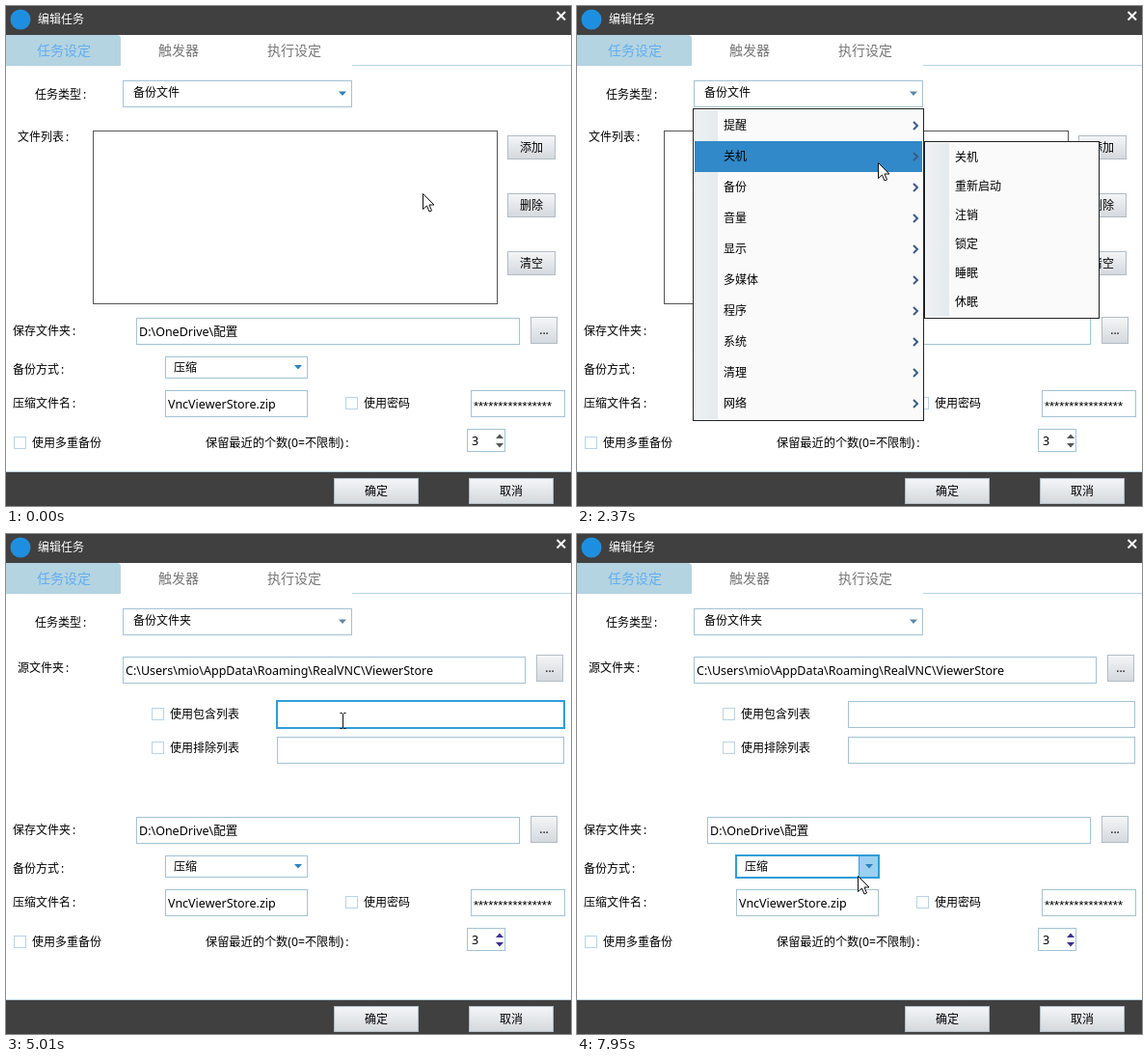
Write an HTML page with a canvas that moves like this. It is 586 px wide and 518 px high and loops after 8 s.

```html
<!DOCTYPE html>
<html lang="zh">
<head>
<meta charset="utf-8">
<style>
html, body { margin: 0; width: 100%; height: 100%; overflow: hidden; background: #fff; }
canvas { display: block; }
</style>
</head>
<body>
<canvas id="stage" width="586" height="518"></canvas>
<script>
const c = document.getElementById('stage').getContext('2d');
const LOOP = 8000, MENU_AT = 1570, PAGE_AT = 3790;
const FONT = '"Noto Sans", "Noto Sans CJK SC", "Noto Sans CJK", sans-serif';
const EDGE = '#a3c3d6', PALE = '#b9d4e4', HOT = '#2f9ed9', SELECT = '#3189c9', DARK = '#404040';

// Pointer moves: start, last step, number of steps, destination
const moves = [
  [260, 1020, 12, 340, 78],
  [2030, 2170, 3, 312, 156],
  [2370, 2510, 3, 312, 180],
  [2710, 2920, 4, 438, 203],
  [2990, 3190, 3, 437, 212],
  [3790, 3860, 2, 438, 213],
  [3930, 4210, 5, 440, 190],
  [4410, 4680, 4, 352, 163],
  [4940, 5010, 2, 349, 193],
  [5080, 5690, 8, 196, 196],
  [5960, 6170, 4, 221, 219],
  [6240, 6310, 2, 224, 220],
  [6560, 6630, 2, 215, 184],
  [6850, 7540, 11, 265, 319],
  [7610, 7950, 5, 291, 354]
];
const clicks = [[1420, 1570], [3520, 3790], [5890, 5960], [6310, 6380], [6450, 6520], [6780, 6850]];

const menu = ['提醒', '关机', '备份', '音量', '显示', '多媒体', '程序', '系统', '清理', '网络'];
const submenus = {
  1: ['关机', '重新启动', '注销', '锁定', '睡眠', '休眠'],
  2: ['备份文件', '备份文件夹', '备份系统目录', '备份注册表分支', '同步文件夹']
};

const shapes = {
  arrow: new Path2D('M0 0V16L4 12.5 6.5 18.5 9 17.5 6.5 11.5H11.5Z'),
  hand: new Path2D('M-2 13V1q0-2 2-2t2 2V8q2-2 4 .5 2-1.5 4 1 2.500-.5 2.500 2V15q0 3-2 5V23H0V21L-5 14q-2-3 0-4 1.500-.5 3 2z'),
  beam: new Path2D('M-3-8h2l1 1 1-1h2M0-7V7M-3 8h2l1-1 1 1h2')
};

let mouse;
const between = (t, a, b) => t >= a && t < b;
const over = (x, y, w, h) => between(mouse.x, x, x + w) && between(mouse.y, y, y + h);

function pointerAt(t) {
  let x = 432, y = 194;
  for (const [start, end, steps, toX, toY] of moves) {
    if (t < start) break;
    const step = Math.floor((t - start) / (end - start) * (steps - 1) + 1.001);
    const p = Math.min(1, step / steps), e = p * p * (3 - 2 * p);
    x += (toX - x) * e;
    y += (toY - y) * e;
  }
  return { x: Math.round(x), y: Math.round(y), kind: 'arrow' };
}

function fill(x, y, w, h, color) {
  c.fillStyle = color;
  c.fillRect(x, y, w, h);
}

function frame(x, y, w, h, color = EDGE) {
  c.strokeStyle = color;
  c.lineWidth = 1;
  c.strokeRect(x + .5, y + .5, w - 1, h - 1);
}

function line(color, width, ...points) {
  c.strokeStyle = color;
  c.lineWidth = width;
  c.beginPath();
  points.forEach(([x, y]) => c.lineTo(x, y));
  c.stroke();
}

// y is the middle of the glyphs
function text(s, x, y, color = '#000', size = 12, align = 'left', font = FONT) {
  c.font = `${size}px ${font}`;
  c.fillStyle = color;
  c.textAlign = align;
  c.fillText(s, x, Math.round(y + size * .37));
}

function label(s, x, y, size = 12) {
  text(s + '\u2009:', x, y, '#000', size);
}

function triangle(x, y, dir, color) {
  c.fillStyle = color;
  c.beginPath();
  c.moveTo(x - 4, y - 2 * dir);
  c.lineTo(x + 4, y - 2 * dir);
  c.lineTo(x, y + 2.5 * dir);
  c.fill();
}

function button(name, x, y, w, h) {
  const g = c.createLinearGradient(0, y, 0, y + h);
  g.addColorStop(0, '#f5f6f7');
  g.addColorStop(1, '#d3d8dd');
  fill(x, y, w, h, g);
  frame(x, y, w, h, '#b3bcc4');
  text(name, x + w / 2, y + h / 2, '#000', 12, 'center');
}

function box(x, y, w, h, hot, edge = EDGE) {
  fill(x, y, w, h, '#fff');
  frame(x, y, w, h, edge);
  if (hot) {
    c.strokeStyle = HOT;
    c.lineWidth = 2;
    c.strokeRect(x, y, w, h);
  }
}

function field(value, x, y, w) {
  const hot = over(x, y, w, 28);
  box(x, y, w, 28, hot);
  if (hot) mouse.kind = 'beam';
  text(value, x + 3, y + 14, '#000', 12.5);
}

function combo(value, x, y, w, h, hot, arrow = '#2f80bd') {
  const big = h > 25;
  box(x, y, w, h, hot);
  if (hot) {
    fill(x + w - 20, y + 1, 19, h - 2, '#9bd0f2');
    line(HOT, 1, [x + w - 20.5, y], [x + w - 20.5, y + h]);
  }
  text(value, x + (big ? 11 : 9), y + (big ? 13 : 12));
  triangle(x + w - 10, y + h / 2 - .5, 1, arrow);
}

function check(name, x, y, on = false, live = false) {
  const hot = live && over(x, y - 2, 93, 20);
  if (hot) mouse.kind = 'hand';
  box(x, y, 13, 13, false, PALE);
  if (hot || on) {
    c.strokeStyle = HOT;
    c.lineWidth = 2;
    c.strokeRect(x, y, 13, 13);
  }
  if (on) line('#6da31f', 2.5, [x + 3, y + 6], [x + 6, y + 10], [x + 11, y + 2]);
  text(name, x + 19, y + 7);
}

function windowFrame() {
  fill(0, 0, 586, 518, '#fff');
  fill(0, 0, 586, 30, DARK);
  c.fillStyle = '#1e8fe0';
  c.beginPath();
  c.arc(15, 14, 10.5, 0, 7);
  c.fill();
  text('编辑任务', 33, 14, '#fff');
  line('#fff', 2, [571.5, 6], [580, 14.5]);
  line('#fff', 2, [580, 6], [571.5, 14.5]);
  c.fillStyle = '#b5d4e2';
  c.beginPath();
  c.roundRect(0, 30, 119, 32, [0, 4, 0, 0]);
  c.fill();
  text('任务设定', 32, 46, '#62aeee', 14);
  text('触发器', 158, 46, '#777', 14);
  text('执行设定', 271, 46, '#777', 14);
  fill(359, 61, 227, 1, PALE);
  fill(0, 482, 586, 1, PALE);
  fill(0, 483, 586, 35, DARK);
  button('确定', 340, 489, 88, 27);
  button('取消', 480, 489, 88, 27);
}

function fileList() {
  label('文件列表', 12, 136);
  frame(90, 129, 420, 180, '#555');
  ['添加', '删除', '清空'].forEach((s, i) => button(s, 520, 134 + 60 * i, 50, 25));
}

function folderOptions(t) {
  label('源文件夹', 12, 139);
  field('C:\\Users\\mio\\AppData\\Roaming\\RealVNC\\ViewerStore', 121, 127, 418);
  button('...', 550, 125, 28, 28);
  check('使用包含列表', 151, 180, between(t, 5960, 6850), true);
  check('使用排除列表', 151, 215, between(t, 6380, 6520), true);
  field('', 281, 173, 298);
  field('', 281, 210, 298);
}

function saveOptions(top, folderPage) {
  label('保存文件夹', 7, top + 14);
  field('D:\\OneDrive\\配置', 135, top, 398);
  button('...', 544, top - 1, 28, 28);
  label('备份方式', 7, top + 54);
  combo('压缩', 165, top + 40, 148, 23, folderPage && over(165, top + 40, 148, 23));
  label('压缩文件名', 7, top + 89);
  field('VncViewerStore.zip', 165, top + 75, 148);
  check('使用密码', 352, top + 82);
  field('', 482, top + 75, 98);
  text('*'.repeat(16), 485, top + 91, '#000', 13, 'left', '"Liberation Sans", sans-serif');
  check('使用多重备份', 8, top + 123);
  label('保留最近的个数(0=不限制)', 207, top + 129, 12.2);
  box(478, top + 115, 40, 24, false);
  text('3', 483, top + 127, '#000', 12.5);
  const ink = folderPage ? '#3d2c8c' : '#555';
  triangle(512, top + 123, -1, ink);
  triangle(512, top + 132, 1, ink);
}

function panel(x, y, w, h) {
  fill(x, y, w, h, '#fafafa');
  const g = c.createLinearGradient(x, 0, x + 26, 0);
  g.addColorStop(0, '#eef2f4');
  g.addColorStop(1, '#e4eaed');
  fill(x + 2, y + 2, 24, h - 4, g);
  frame(x, y, w, h, '#222');
}

function openMenu() {
  const inSub = mouse.x >= 360;
  const row = inSub ? 2 : Math.floor((mouse.y - 108) / 32);
  panel(120, 106, 240, 324);
  menu.forEach((s, i) => {
    const y = 124 + 32 * i;
    if (i === row) fill(122, y - 16, 236, 32, SELECT);
    text(s, 152, y);
    line('#3d5b86', 2, [349, y - 4], [353, y], [349, y + 4]);
  });
  const items = submenus[row];
  if (!items) return;
  const top = 108 + 32 * row, gap = row === 2 ? 6 : 0;
  panel(360, top, 182, items.length * 30 + 4 + gap);
  items.forEach((s, i) => {
    const y = top + 2 + 30 * i + (i === 4 ? gap : 0);
    if (inSub && between(mouse.y, y, y + 30)) fill(362, y, 178, 30, SELECT);
    text(s, 392, y + 15);
  });
  if (gap) fill(391, 297, 144, 1, '#b5b5b5');
}

function drawPointer(t) {
  if (clicks.some(([a, b]) => between(t, a, b))) {
    c.fillStyle = 'rgba(255, 255, 0, .47)';
    c.beginPath();
    c.arc(mouse.x, mouse.y, 12, 0, 7);
    c.fill();
  }
  c.save();
  c.translate(mouse.x + .5, mouse.y + .5);
  c.fillStyle = '#fff';
  c.strokeStyle = '#111';
  c.lineWidth = mouse.kind === 'hand' ? 1.2 : 1;
  if (mouse.kind !== 'beam') c.fill(shapes[mouse.kind]);
  c.stroke(shapes[mouse.kind]);
  if (mouse.kind === 'hand') {
    line('#111', 1, [2, 8], [2, 12]);
    line('#111', 1, [6, 9], [6, 12]);
    line('#111', 1, [10, 10], [10, 13]);
  }
  c.restore();
}

function draw(t) {
  mouse = pointerAt(t);
  const folderPage = t >= PAGE_AT;
  const typeHot = t < 2030 && over(121, 77, 238, 28);
  windowFrame();
  label('任务类型', 30, 92);
  combo(folderPage ? '备份文件夹' : '备份文件', 121, 77, 238, 28, typeHot, t < MENU_AT ? '#2f80bd' : '#5f87a8');
  if (folderPage) folderOptions(t);
  else fileList();
  saveOptions(folderPage ? 293 : 323, folderPage);
  if (between(t, MENU_AT, PAGE_AT)) openMenu();
  if (typeHot) mouse.kind = 'hand';
  drawPointer(t);
}

const began = performance.now();
function tick() {
  draw((performance.now() - began) % LOOP);
  requestAnimationFrame(tick);
}
tick();
</script>
</body>
</html>
```
